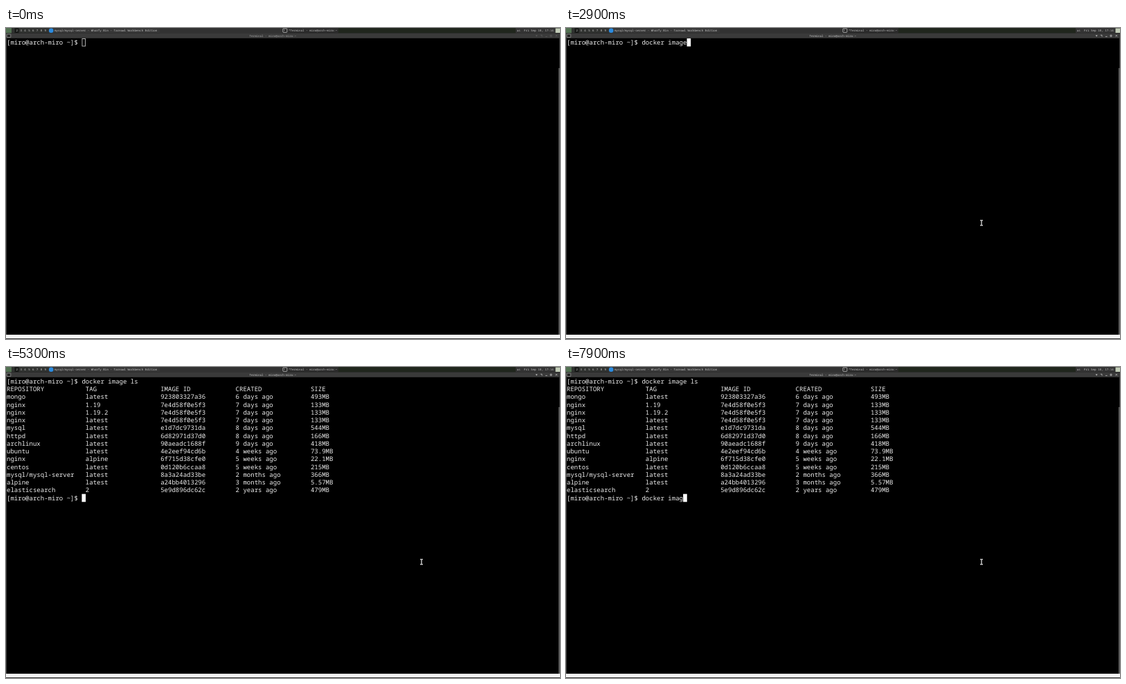
Write an HTML page that moves like this. It is 800 by 450 pixels and loops after 8 s.

```html
<!DOCTYPE html>
<html lang="en">
<head>
<meta charset="utf-8">
<title>Terminal</title>
<style>
html, body { margin: 0; width: 100%; height: 100%; overflow: hidden; background: #000; }
svg { display: block; width: 800px; height: 450px; }
text { font-family: "Noto Sans Mono", "DejaVu Sans Mono", monospace; white-space: pre; text-rendering: geometricPrecision; }
#lines text { font-size: 9.04px; fill: #ececec; }
.bar text { font-size: 4.2px; fill: #c4c4c4; }
</style>
</head>
<body>
<svg viewBox="0 0 800 450">
  <rect width="800" height="450" fill="#000"/>
  <g class="bar">
    <rect width="800" height="7.5" fill="#303230"/>
    <rect x="62" width="336" height="7.5" fill="#373737"/>
    <rect x="222" width="176" height="7.5" fill="#323232"/>
    <rect x="398" width="82" height="7.5" fill="#2b2b2b"/>
    <rect x="480" width="256" height="7.5" fill="#20261d"/>
    <rect x="736" width="57" height="7.5" fill="#333"/>
    <rect width="8" height="7.5" fill="#527052"/>
    <rect x="12.5" width="6" height="7.5" fill="#161816"/>
    <g id="spaces"></g>
    <circle cx="65.2" cy="3.7" r="3.3" fill="#2b8be0"/>
    <text x="70" y="5.1">mysql/mysql-server - Wharfy Bin - Tarnowl Workbench Edition</text>
    <rect x="399.8" y="0.9" width="6" height="5.4" rx=".6" fill="#222" stroke="#c8c8c8" stroke-width=".8"/>
    <path d="M401.2 2.3l1.3 1-1.3 1" fill="none" stroke="#ddd" stroke-width=".5"/>
    <text x="408" y="5.1">*Terminal - miro@arch-miro:~</text>
    <text x="737.8" y="5.1">us</text>
    <text x="748" y="5.1">Fri Sep 18, 17:14</text>
    <rect x="793.5" y="0.5" width="6.5" height="6.5" fill="#c3ceb9"/>

    <rect id="title" y="7.5" width="800" height="7.3" fill="#3a3a3a"/>
    <rect x="1.2" y="9" width="5.6" height="4.6" rx=".5" fill="#222" stroke="#aaa" stroke-width=".7"/>
    <text id="name" x="351.5" y="12.9">Terminal - miro@arch-miro:~</text>
    <g id="buttons" fill="none" stroke="#d0d0d0" stroke-width=".7">
      <path d="M764.6 10.5h3l-1.5 2z" fill="#d0d0d0" stroke="none"/>
      <path d="M771.8 10.3h2.2v2.4M779 12.4h2.6M786 10.3h2v2h-2zM793.6 10.1l2.4 2.4M796 10.1l-2.4 2.4"/>
    </g>
  </g>
  <path d="M.4 14.8V450M799.6 14.8V450" stroke="#555" stroke-width=".8"/>
  <rect x="798" y="58" width="1.4" height="386" fill="#686868"/>
  <rect y="443.8" width="800" height="5.2" fill="#f3f3f3"/>
  <rect y="449" width="800" height="1" fill="#383838"/>

  <g id="lines"></g>
  <rect id="cursor"/>
  <g id="mouse" fill="none">
    <path d="M-2-3.6h4M-2 3.6h4M0-3.6v7.2" stroke="#555" stroke-width="1.8"/>
    <path d="M-2-3.6h4M-2 3.6h4M0-3.6v7.2" stroke="#e4e4e4" stroke-width=".9"/>
  </g>
</svg>
<script>
const LOOP = 8000, CELL = 5.424, ROW = 11.24, LEFT = 1, TOP = 15.1;
const PROMPT = '[miro@arch-miro ~]$ ';
const COMMAND = 'docker image ls';
const FOCUS = 400, ENTER = 5200, OUTPUT = 5300;

// [time, typed characters]
const FIRST = [[1400, 1], [1500, 3], [1700, 4], [1800, 5], [1900, 6], [2100, 7], [2300, 8],
  [2600, 9], [2700, 10], [2800, 11], [2900, 12], [3400, 13], [3600, 14], [3700, 15]];
const SECOND = [[6500, 1], [6700, 2], [6900, 3], [7000, 4], [7100, 6], [7300, 7],
  [7400, 8], [7600, 10], [7800, 11]];

const TABLE = `REPOSITORY|TAG|IMAGE ID|CREATED|SIZE
mongo|latest|923803327a36|6 days ago|493MB
nginx|1.19|7e4d58f0e5f3|7 days ago|133MB
nginx|1.19.2|7e4d58f0e5f3|7 days ago|133MB
nginx|latest|7e4d58f0e5f3|7 days ago|133MB
mysql|latest|e1d7dc9731da|8 days ago|544MB
httpd|latest|6d82971d37d0|8 days ago|166MB
archlinux|latest|90aeadc1688f|9 days ago|418MB
ubuntu|latest|4e2eef94cd6b|4 weeks ago|73.9MB
nginx|alpine|6f715d38cfe0|5 weeks ago|22.1MB
centos|latest|0d120b6ccaa8|5 weeks ago|215MB
mysql/mysql-server|latest|8a3a24ad33be|2 months ago|366MB
alpine|latest|a24bb4013296|3 months ago|5.57MB
elasticsearch|2|5e9d896dc62c|2 years ago|479MB`
  .split('\n')
  .map(row => row.split('|').map((cell, i) => cell.padEnd(i ? 20 : 21)).join('').trimEnd());

const $ = id => document.getElementById(id);

function addText(parent, x, y, value) {
  const el = document.createElementNS('http://www.w3.org/2000/svg', 'text');
  el.setAttribute('x', x);
  el.setAttribute('y', y);
  el.textContent = value;
  parent.append(el);
  return el;
}

function set(el, attrs) {
  for (const key in attrs) el.setAttribute(key, attrs[key]);
}

for (let i = 0; i < 8; i++) addText($('spaces'), 14.6 + i * 5.85, 5.1, i + 2);

const rows = Array.from({ length: TABLE.length + 2 }, (_, i) =>
  addText($('lines'), LEFT, TOP + 8.9 + i * ROW, ''));

const typed = (steps, t) =>
  COMMAND.slice(0, steps.reduce((n, [at, count]) => t >= at ? count : n, 0));

function screenAt(t) {
  const screen = [PROMPT + typed(FIRST, t)];
  if (t >= OUTPUT) screen.push(...TABLE, PROMPT + typed(SECOND, t));
  else if (t >= ENTER) screen.push('');
  return screen;
}

function draw(t) {
  const screen = screenAt(t);
  rows.forEach((row, i) => {
    const value = screen[i] || '';
    if (row.textContent !== value) row.textContent = value;
  });

  const focused = t >= FOCUS;
  const last = screen.length - 1;
  const inset = focused ? 0 : .5;
  set($('cursor'), {
    x: LEFT + screen[last].length * CELL + inset,
    y: TOP + last * ROW + inset,
    width: CELL + .2 - inset * 2,
    height: ROW + .3 - inset * 2,
    fill: focused ? '#fff' : 'none',
    stroke: focused ? 'none' : '#d8d8d8',
    'stroke-width': .8
  });
  $('name').style.fill = focused ? '#c8c8c8' : '#a8a8a8';
  $('buttons').setAttribute('opacity', focused ? 1 : .25);

  // pointer glides in from the tray
  const p = Math.min(1, Math.max(0, (t - 100) / 400));
  const ease = 1 - (1 - p) ** 2;
  set($('mouse'), {
    transform: `translate(${796 - 196 * ease} ${4 + 278 * ease})`,
    visibility: t < 100 ? 'hidden' : 'visible'
  });
}

const start = performance.now();
function tick(now) {
  draw(Math.max(0, now - start) % LOOP);
  requestAnimationFrame(tick);
}
draw(0);
requestAnimationFrame(tick);
</script>
</body>
</html>
```
